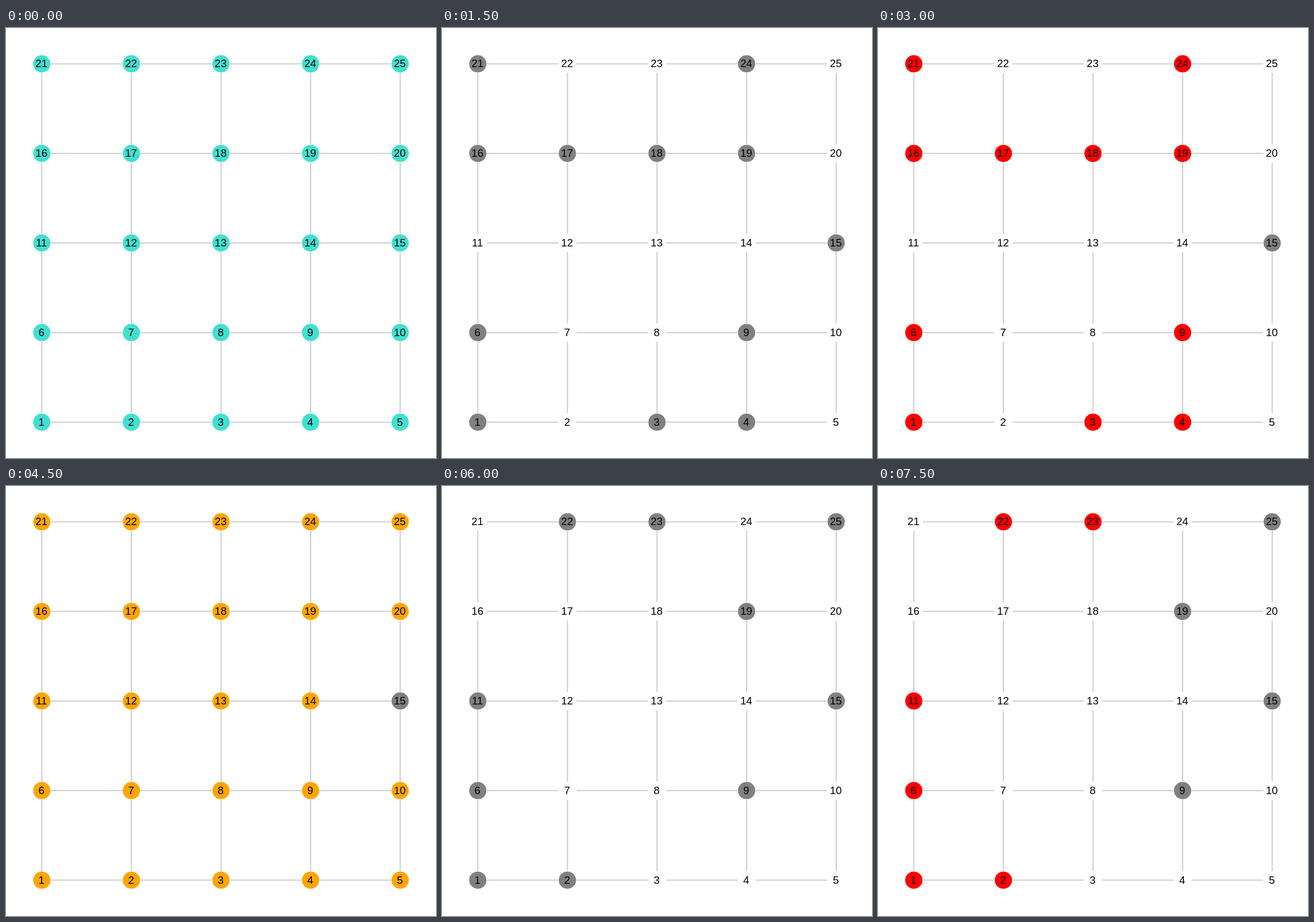
An HTML page that plays this animation: 748x748 px, repeating every 8000 ms.

```html
<!DOCTYPE html>
<html lang="en">
<head>
<meta charset="utf-8">
<title>Grid states</title>
<style>
  html, body { margin: 0; width: 100%; height: 100%; overflow: hidden; background: #fff; }
  svg { display: block; width: 100vw; height: 100vh; }
  line { stroke: #d3d3d3; stroke-width: 2.3; }
  text { font: 18.6px "Liberation Sans", Arial, sans-serif; text-anchor: middle; fill: #000; }
</style>
</head>
<body>
<svg id="stage" viewBox="0 0 748 748"></svg>
<script>
const SIZE = 5, STEP = 155.85, MID = 374, RADIUS = 15, GAP = 15.8;
const LOOP = 8000, HOLD = 1500;
const TURQUOISE = '#40e0d0', GREY = '#808080', RED = '#ff0000', ORANGE = '#ffa500', EMPTY = '#ffffff';

// Each state: the fill of all other nodes, then the nodes of each special colour.
const states = [
  { rest: TURQUOISE },
  { rest: EMPTY, [GREY]: [1, 3, 4, 6, 9, 15, 16, 17, 18, 19, 21, 24] },
  { rest: EMPTY, [GREY]: [15], [RED]: [1, 3, 4, 6, 9, 16, 17, 18, 19, 21, 24] },
  { rest: ORANGE, [GREY]: [15] },
  { rest: EMPTY, [GREY]: [1, 2, 6, 9, 11, 15, 19, 22, 23, 25] },
  { rest: EMPTY, [GREY]: [9, 15, 19, 25], [RED]: [1, 2, 6, 11, 22, 23] },
];

const stage = document.getElementById('stage');

function add(name, attrs, content = '') {
  const el = document.createElementNS('http://www.w3.org/2000/svg', name);
  for (const key in attrs) el.setAttribute(key, attrs[key]);
  el.textContent = content;
  return stage.appendChild(el);
}

const place = i => MID + (i - (SIZE - 1) / 2) * STEP;

function fillOf(state, node) {
  return [GREY, RED].find(color => state[color]?.includes(node)) || state.rest;
}

for (let i = 0; i < SIZE; i++) {
  for (let j = 0; j < SIZE - 1; j++) {
    const across = place(i), from = place(j) + GAP, to = place(j + 1) - GAP;
    add('line', { x1: from, x2: to, y1: across, y2: across });
    add('line', { x1: across, x2: across, y1: from, y2: to });
  }
}

for (let node = 1; node <= SIZE * SIZE; node++) {
  const x = place((node - 1) % SIZE);
  const y = place(SIZE - 1 - Math.floor((node - 1) / SIZE));
  const frames = states.map((state, k) => ({
    fill: fillOf(state, node), offset: k * HOLD / LOOP, easing: 'step-end',
  }));
  frames.push({ ...frames[frames.length - 1], offset: 1 });

  const circle = add('circle', { cx: x, cy: y, r: RADIUS, fill: frames[0].fill });
  circle.animate(frames, { duration: LOOP, iterations: Infinity });
  add('text', { x: x - 0.6, y: y + 6 }, node);
}
</script>
</body>
</html>
```
